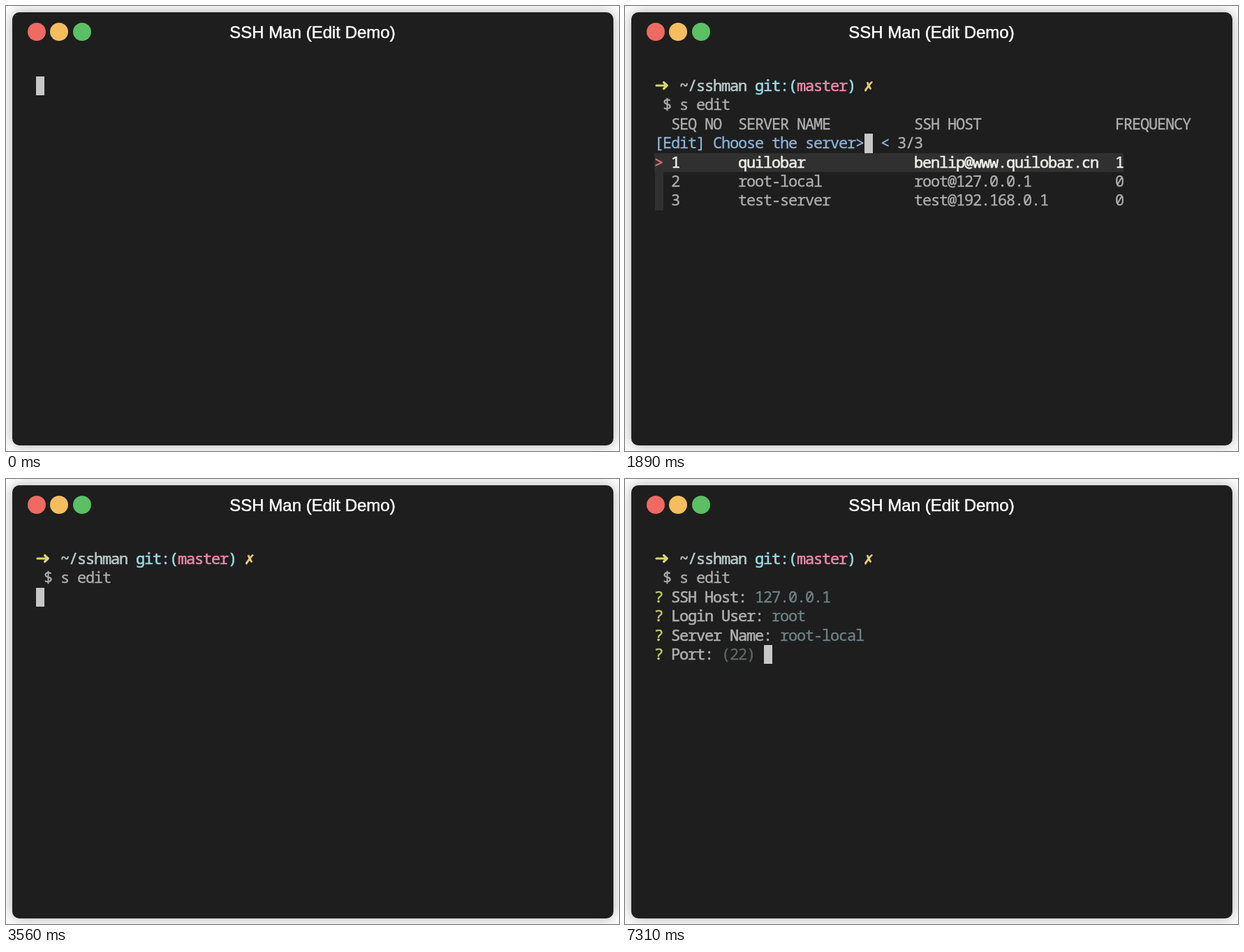
An HTML page that plays this animation: 878 by 638 pixels, repeating every 8000 ms.

```html
<!DOCTYPE html>
<html lang="en">
<head>
<meta charset="utf-8">
<title>SSH Man</title>
<style>
html, body { margin: 0; width: 100%; height: 100%; overflow: hidden; background: #fff; }
#win { position: absolute; left: 8.5px; top: 8.5px; width: 861px; height: 621px; border-radius: 10px;
  background: #1e1e1e; box-shadow: 0 0 20px rgba(0, 0, 0, .33); }
.dot { position: absolute; top: 15px; width: 26px; height: 26px; border-radius: 50%; }
#title { position: absolute; left: 0; width: 100%; top: 15.5px; text-align: center; color: #fff;
  font: 24px/28px "Liberation Sans", Arial, sans-serif; -webkit-text-stroke: .5px #fff; }
#term { position: absolute; left: 33.5px; top: 92.5px; color: #afafaf; letter-spacing: -1.2px;
  font: 22px/25.4px "Noto Sans Mono", monospace; font-variant-ligatures: none; -webkit-text-stroke: .35px; }
#term div { height: 27.4px; white-space: pre; }
i { font-style: normal; }
.cursor, .gutter, .sel { display: inline-block; height: 27.4px; vertical-align: top; }
.cursor, .gutter { width: 12px; margin: 0 -1px 0 1px; }
.cursor { background: #c7c7c7; }
.gutter, .sel { background: #303030; }
.sel { color: #efefea; }
.sel, .path, .git, .branch, .dirty, .ask, .label { -webkit-text-stroke-width: .6px; }
.arrow { display: inline-block; width: 36px; height: 27.4px; vertical-align: top; fill: none;
  stroke: #d8d775; stroke-width: 3.2; stroke-linecap: round; stroke-linejoin: round; }
.path { color: #b8cac9; }
.git { color: #98dae6; }
.branch { color: #ec87a8; }
.dirty { color: #e4d07e; font: bold 23px/0 "DejaVu Sans Mono", "DejaVu Sans", monospace; }
.ask { color: #bfcb67; }
.answer { color: #708387; }
.hint { color: #626566; }
.prompt { color: #8db3d7; }
.pointer { color: #dc6f70; }
.hit { color: #879a8c; }
.sel .hit { color: #a9c6b5; }
</style>
</head>
<body>
<div id="win">
  <div class="dot" style="left:22px;background:#ee6a62"></div>
  <div class="dot" style="left:54.5px;background:#f5bd60"></div>
  <div class="dot" style="left:87.5px;background:#5bc063"></div>
  <div id="title">SSH Man (Edit Demo)</div>
  <div id="term"></div>
</div>
<script>
const tag = (cls, text = '') => `<i class="${cls}">${text}</i>`;
const cursor = tag('cursor');

const prompt = '<svg class="arrow" viewBox="0 0 36 27.4"><path d="M3 13H18M13.5 8.5L18.3 13L13.5 17.5"/></svg>' +
  tag('path', '~/sshman') + ' ' + tag('git', 'git:(') + tag('branch', 'master') + tag('git', ')') +
  ' ' + tag('dirty', '✗');
const shell = (typed, ...rows) => [prompt, ' $ ' + typed, ...rows];

// Fuzzy finder
const columns = (no, name, host, count) => no.padEnd(8) + name.padEnd(21) + host.padEnd(24) + count;
const header = '  ' + columns('SEQ NO', 'SERVER NAME', 'SSH HOST', 'FREQUENCY');
const site = columns('1', 'quilobar', 'benlip@www.quilobar.cn', '1');
const local = columns('2', 'root-local', 'root@127.0.0.1', '0');
const spare = columns('3', 'test-server', 'test@192.168.0.1', '0');

const mark = (text, hits) => [...text].map((c, i) => hits.includes(i) ? tag('hit', c) : c).join('');
const finder = (query, ...items) => shell('s edit', header,
  tag('prompt', '[Edit] Choose the server>') + query + cursor + ' ' + tag('prompt', '&lt;') + ` ${items.length}/3`,
  ...items.map(([text, ...hits], i) => i
    ? tag('gutter') + ' ' + mark(text, hits)
    : tag('sel', tag('pointer', '&gt;') + ' ' + mark(text, hits))));

// Questions: the last one is open when it carries a hint
const label = text => tag('ask', '?') + ' ' + tag('label', text + ':') + ' ';
const done = (text, value) => label(text) + tag('answer', value);
const open = (text, value) => label(text) + tag('hint', `(${value})`) + ' ' + cursor;
const form = (...rows) => shell('s edit', ...rows);
const host = ['SSH Host', '127.0.0.1'], user = ['Login User', 'root'], server = ['Server Name', 'root-local'];

const scenes = [
  [0, [cursor]],
  [30, shell(cursor)],
  [560, shell('s' + cursor)],
  [710, shell('s ' + cursor)],
  [870, shell('s e' + cursor)],
  [1110, shell('s ed' + cursor)],
  [1280, shell('s edi' + cursor)],
  [1430, shell('s edit' + cursor)],
  [1640, form(cursor)],
  [1770, form(header + cursor)],
  [1890, finder('', [site], [local], [spare])],
  [2380, finder('r', [site, 15], [local, 8], [spare, 15])],
  [2520, finder('ro', [site, 15, 44], [local, 8, 9])],
  [2680, finder('roo', [local, 8, 9, 10])],
  [2840, finder('root', [local, 8, 9, 10, 11])],
  [3560, form(cursor)],
  [3660, form(open(...host))],
  [4760, form(done(...host), cursor)],
  [4960, form(done(...host), open(...user))],
  [5570, form(done(...host), done(...user), cursor)],
  [5670, form(done(...host), done(...user), open(...server))],
  [7110, form(done(...host), done(...user), done(...server), cursor)],
  [7310, form(done(...host), done(...user), done(...server), open('Port', '22'))],
];

const term = document.getElementById('term');
const start = performance.now();
let shown;
function draw() {
  const t = (performance.now() - start) % 8000;
  const scene = scenes.findLast(([from]) => from <= t);
  if (scene !== shown) {
    shown = scene;
    term.innerHTML = scene[1].map(row => `<div>${row}</div>`).join('');
  }
  requestAnimationFrame(draw);
}
draw();
</script>
</body>
</html>
```
